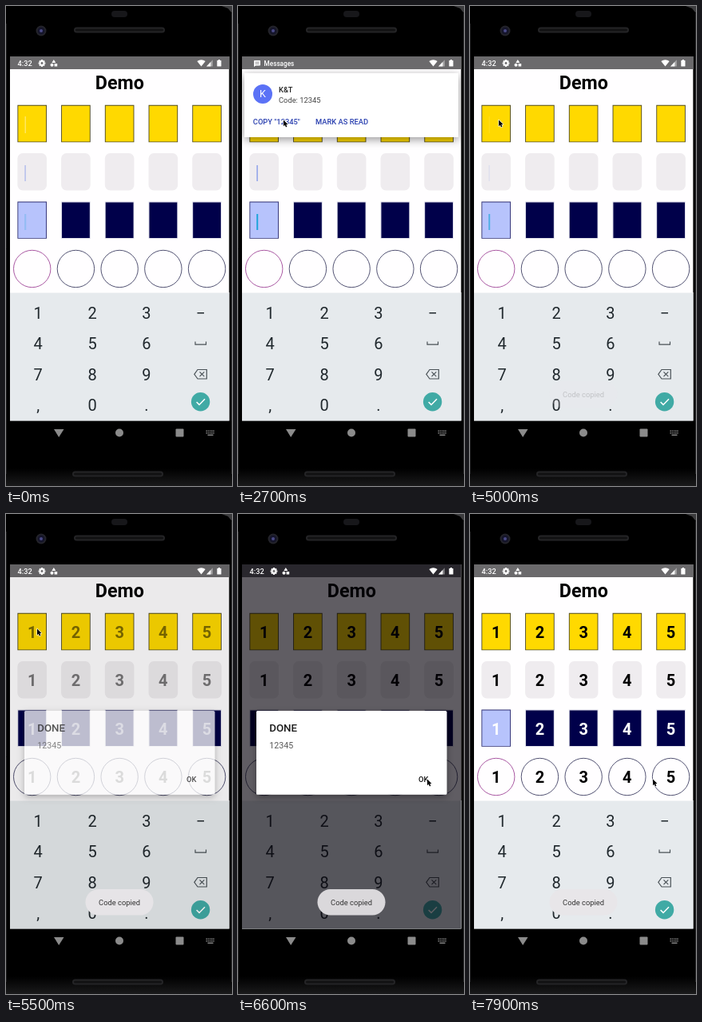
These frames come from a looping animation (283 px wide and 600 px high, 8000 ms). An HTML page with a canvas:

```html
<!DOCTYPE html>
<html lang="en">
<head>
<meta charset="utf-8">
<title>Code input demo</title>
<style>
html, body { margin: 0; width: 100%; height: 100%; overflow: hidden; background: #000; }
canvas { display: block; width: 283px; height: 600px; }
</style>
</head>
<body>
<canvas id="stage"></canvas>
<script>
const W = 283, H = 600, LOOP = 8000;
const SCREEN = [5, 63, 274.6, 455.6];
const canvas = document.getElementById('stage');
const dpr = window.devicePixelRatio || 1;
canvas.width = Math.round(W * dpr);
canvas.height = Math.round(H * dpr);
const c = canvas.getContext('2d');

const clamp = v => Math.max(0, Math.min(1, v));
const ramp = (t, a, b) => clamp((t - a) / (b - a));
const smooth = v => v * v * (3 - 2 * v);
const pulse = (t, a, b, d, e) => ramp(t, a, b) * (1 - ramp(t, d, e));
const colX = i => 32.7 + 54.72 * i;

function rect(x, y, w, h, fill, r = 0) {
  c.fillStyle = fill;
  c.beginPath();
  c.roundRect(x, y, w, h, r);
  c.fill();
}
function bordered(x, y, w, h, fill, border, line = 0.9) {
  rect(x, y, w, h, border);
  rect(x + line, y + line, w - 2 * line, h - 2 * line, fill);
}
function disc(x, y, r, fill) {
  c.fillStyle = fill;
  c.beginPath();
  c.arc(x, y, r, 0, 7);
  c.fill();
}
function ring(x, y, r, color, width) {
  c.strokeStyle = color;
  c.lineWidth = width;
  c.beginPath();
  c.arc(x, y, r, 0, 7);
  c.stroke();
}
function poly(points, fill) {
  c.fillStyle = fill;
  c.beginPath();
  points.forEach(([x, y]) => c.lineTo(x, y));
  c.closePath();
  c.fill();
}
function line(points, color, width) {
  c.strokeStyle = color;
  c.lineWidth = width;
  c.beginPath();
  points.forEach(([x, y]) => c.lineTo(x, y));
  c.stroke();
}
function text(s, x, y, size, color, weight = 400, align = 'left') {
  c.font = `${weight} ${size}px Roboto, "Open Sans", sans-serif`;
  c.textAlign = align;
  c.fillStyle = color;
  c.fillText(s, x, y);
}
function layer(alpha, draw) {
  if (alpha <= 0) return;
  c.save();
  c.globalAlpha *= alpha;
  draw();
  c.restore();
}
// The shadow stays outside the card, so a fading card is not darkened.
function card(x, y, w, h, shade, blur, r) {
  c.save();
  c.beginPath();
  c.rect(0, 0, W, H);
  c.rect(x, y, w, h);
  c.clip('evenodd');
  c.shadowColor = `rgba(0,0,0,${shade})`;
  c.shadowBlur = blur * dpr;
  c.shadowOffsetY = 3 * dpr;
  rect(x, y, w, h, '#fff', r);
  c.restore();
  rect(x, y, w, h, '#fff', r);
}

function drawPhone() {
  rect(0, 0, W, H, '#000');
  const base = c.createLinearGradient(0, 578, 0, H);
  base.addColorStop(0, '#000');
  base.addColorStop(1, '#1a1a1b');
  rect(0, 578, W, 22, base);
  poly([[270, 0], [W, 0], [W, 9], [278, 3]], '#3c3c3e');
  line([[0.5, 22], [0.5, 585]], '#1b1b1d', 1);
  line([[282.5, 9], [282.5, 585]], '#252527', 1);
  rect(132, 6, 20, 8, '#17171a', 4);
  for (const [x, y] of [[85, 26.5], [83, 581.5]]) {
    rect(x, y, 114, 7, '#242426', 3.5);
    rect(x + 2, y + 2, 110, 3, '#121213', 1.5);
  }
  disc(44, 31, 6.5, '#24242a');
  disc(44, 31, 4.5, '#15152a');
  disc(44, 31, 2, '#4a4a86');
}

function drawNav() {
  const gray = '#8b8b8b';
  poly([[60, 529], [72.5, 529], [66.2, 539]], gray);
  disc(142, 533.5, 5, gray);
  rect(212.5, 528.5, 10, 10, gray, 1);
  for (let i = 0; i < 5; i++) {
    rect(250.5 + i * 2.2, 530.5, 1.4, 1.4, gray);
    rect(250.5 + i * 2.2, 533, 1.4, 1.4, gray);
  }
  rect(252.5, 535.6, 7, 1.4, gray);
}

function drawKeyboard() {
  rect(5, 359, 275, 160, '#e6eaed');
  rect(5, 358, 275, 1, '#f3f4f6');
  const ink = '#20282d';
  ['123', '456', '789', ',0.'].forEach((row, r) =>
    [...row].forEach((key, i) =>
      text(key, 40.2 + 67.8 * i, 390.5 + 38.6 * r, 20, ink, 400, 'center')));
  rect(239.5, 383, 8.5, 1.4, ink);
  line([[237, 419.5], [237, 423.2], [250.5, 423.2], [250.5, 419.5]], '#4a5257', 1.2);
  c.beginPath();
  [[235.8, 460.3], [240, 454.5], [251.3, 454.5], [251.3, 466], [240, 466]].forEach(p => c.lineTo(...p));
  c.closePath();
  c.lineWidth = 1.2;
  c.strokeStyle = '#4a5257';
  c.stroke();
  line([[242.5, 457.3], [248.3, 463.1]], '#4a5257', 1.2);
  line([[248.3, 457.3], [242.5, 463.1]], '#4a5257', 1.2);
  disc(243.6, 494.8, 11.7, '#40aaa5');
  line([[238.6, 495], [242, 498.4], [249, 491.2]], '#fff', 1.5);
}

function drawCells(t) {
  const focused = t < 5300 || t > 7450;
  for (let i = 0; i < 5; i++) {
    const x = colX(i), left = x - 18.3, first = i === 0 && focused;
    bordered(left, 123.8, 36.6, 46.5, '#ffd900', '#4d4820');
    rect(left, 184, 36.6, 46.5, '#efecef', 6.5);
    if (first) bordered(left, 244.6, 36.6, 46.2, '#b7c3fc', '#2c2c70');
    else bordered(left, 244.6, 36.6, 46.2, '#00004a', '#d9d9e6');
    ring(x, 328.5, 23.2, first ? '#9a3a92' : '#34345a', 0.85);
  }

  layer(ramp(t, 5390, 5610), () => {
    for (let i = 0; i < 5; i++) {
      [154.9, 215.4, 275.6, 336].forEach((y, r) =>
        text(i + 1, colX(i), y, 20, r === 2 ? '#fff' : '#000', 700, 'center'));
    }
  });

  if (t > 5200) return;
  const p = t % 1080;
  const blink = p > 900 ? ramp(p, 900, 1280) : ramp(p, -180, 120) * (1 - ramp(p, 570, 700));
  const late = p < 500 ? ramp(p, -40, 130) : 1 - ramp(p, 600, 840);
  layer(blink, () => {
    rect(23.5, 138, 1.5, 21, '#fff0a0');
    rect(23.3, 199, 1.6, 20, '#94a6ea');
  });
  layer(late, () => rect(23.2, 260, 2, 20, '#1fa5da'));
}

function drawHeadsUp(t) {
  const shown = smooth(ramp(t, 150, 600)) * (1 - smooth(ramp(t, 4600, 4900)));
  if (shown <= 0) return;
  c.save();
  c.translate(0, -112 * (1 - shown));
  card(8, 84, 268, 80, 0.4, 11, 1);
  layer(pulse(t, 3900, 4020, 4450, 4600), () => {
    c.beginPath();
    c.rect(13, 131.5, 71, 25.5);
    c.clip();
    disc(36, 144, Math.max(0, (t - 3900) * 0.142), '#dadadc');
  });
  disc(31, 110, 12, '#5b72f6');
  text('K', 31, 114.4, 12.5, '#fff', 400, 'center');
  text('K&T', 51, 108, 9.33, '#222', 500);
  text('Code: 12345', 51, 121.3, 9.33, '#444');
  text('COPY "12345"', 18.8, 147.6, 9.33, '#2b41b0', 500);
  text('MARK AS READ', 97, 147.6, 9.33, '#2b41b0', 500);
  c.restore();
}

function drawStatusIcons(t) {
  const msg = pulse(t, 250, 450, 4850, 5000);
  layer(1 - msg, () => {
    text('4:32', 14.6, 75, 9.2, '#fff', 500);
    for (let i = 0; i < 4; i++) {
      c.save();
      c.translate(45, 71.5);
      c.rotate(i * Math.PI / 4);
      rect(-1.1, -4.4, 2.2, 8.8, '#fff', 0.4);
      c.restore();
    }
    disc(45, 71.5, 3.2, '#fff');
    disc(45, 71.5, 1.4, '#6b6a6c');
    poly([[59.8, 67], [62.3, 71], [57.3, 71]], '#fff');
    disc(57.5, 73.7, 2, '#fff');
    rect(60.6, 72, 3.6, 3.6, '#fff');
  });
  layer(msg, () => {
    rect(20, 68, 8, 6.5, '#fff', 0.8);
    poly([[20, 73], [20, 76.3], [22.3, 74]], '#fff');
    rect(21.5, 69.8, 5, 0.8, '#6b6a6c');
    rect(21.5, 71.7, 5, 0.8, '#6b6a6c');
    text('Messages', 32.6, 74.6, 8.2, '#fff', 500);
  });
  c.fillStyle = '#fff';
  c.beginPath();
  c.moveTo(244.5, 75.6);
  c.lineTo(239.3, 69);
  c.quadraticCurveTo(244.5, 65.6, 249.7, 69);
  c.fill();
  poly([[251, 75.5], [258.8, 67.3], [258.8, 75.5]], 'rgba(255,255,255,.4)');
  poly([[251, 75.5], [256.3, 69.9], [256.3, 75.5]], '#fff');
  rect(264.3, 68, 5.2, 7.6, '#fff', 0.6);
  rect(265.8, 67, 2.2, 1.2, '#fff');
}

function drawDialog(t) {
  layer(pulse(t, 5390, 5540, 7300, 7480), () => {
    card(23, 246, 238.4, 104.8, 0.35, 9, 1.5);
    text('DONE', 39.2, 272, 13.3, '#1c1c1c', 500);
    text('12345', 39.3, 292.8, 10.67, '#5a5a5a');
    text('OK', 226, 335.2, 9.33, '#111', 500);
  });
}

function drawToast(t, dim) {
  const k = Math.round(232 - 14 * dim);
  layer(ramp(t, 4950, 5200), () => {
    rect(99.5, 469, 85, 32.5, `rgb(${k},${k - 2},${k + 1})`, 16.2);
    text('Code copied', 142, 488.8, 9.33, '#333', 400, 'center');
  });
}

// Pointer stops: time, x, y
const stops = [
  [2050, 170, 270], [2500, 57, 142], [2950, 57, 142], [3400, 36, 142],
  [5000, 36, 142], [5350, 39, 143], [6100, 39, 143], [6550, 237, 331],
  [7450, 237, 331], [7750, 229, 331], [8000, 229, 331]
];
function drawPointer(t) {
  const n = stops.findIndex(s => s[0] > t);
  if (n < 1) return;
  const [t0, x0, y0] = stops[n - 1], [t1, x1, y1] = stops[n];
  const k = smooth(ramp(t, t0, t1));
  c.save();
  c.translate(x0 + (x1 - x0) * k, y0 + (y1 - y0) * k + 0.6);
  c.scale(0.88, 0.88);
  c.beginPath();
  [[0, 0], [0, 8.6], [2, 6.9], [3.4, 10], [5, 9.3], [3.6, 6.3], [6.2, 6.1]].forEach(p => c.lineTo(...p));
  c.closePath();
  c.lineJoin = 'round';
  c.lineWidth = 1.6;
  c.strokeStyle = 'rgba(255,255,255,.85)';
  c.stroke();
  c.fillStyle = '#000';
  c.fill();
  c.restore();
}

function draw(t) {
  c.setTransform(dpr, 0, 0, dpr, 0, 0);
  const dim = ramp(t, 5450, 5850) * (1 - ramp(t, 7300, 7520));
  drawPhone();
  drawNav();
  c.save();
  c.beginPath();
  c.rect(...SCREEN);
  c.clip();
  rect(...SCREEN, '#fffeff');
  text('Demo', 142.3, 104, 23.3, '#000', 700, 'center');
  drawCells(t);
  drawKeyboard();
  drawHeadsUp(t);
  rect(5, 63, 275, 16, '#6b6a6c');
  rect(...SCREEN, `rgba(4,0,8,${0.63 * dim})`);
  drawStatusIcons(t);
  drawDialog(t);
  drawToast(t, dim);
  drawPointer(t);
  c.restore();
}

const start = performance.now();
function tick() {
  draw((performance.now() - start) % LOOP);
  requestAnimationFrame(tick);
}
tick();
</script>
</body>
</html>
```
